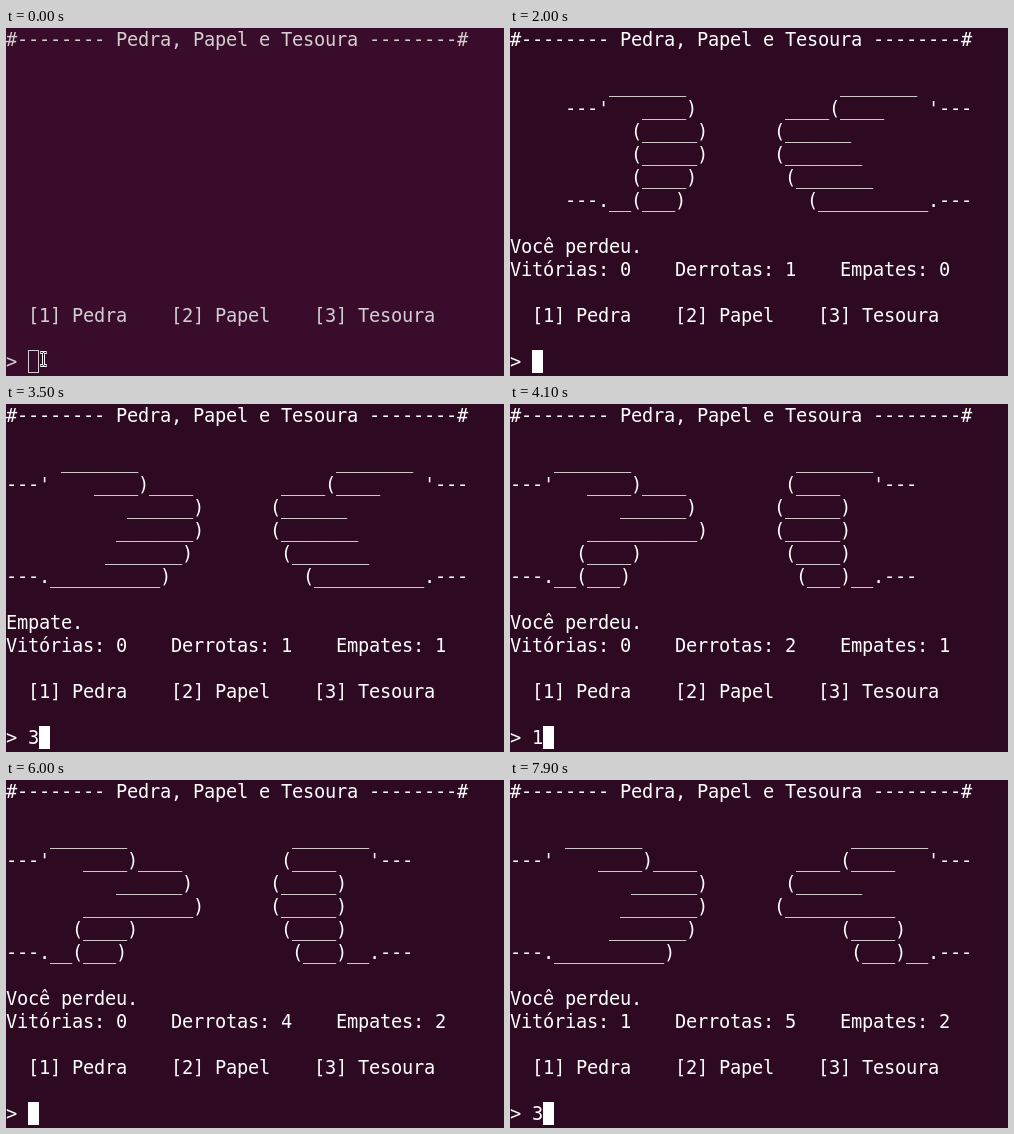
An HTML page for the animation above (8 s loop, 498 px wide and 348 px high).

```html
<!DOCTYPE html>
<html lang="pt">
<head>
<meta charset="utf-8">
<title>Pedra, Papel e Tesoura</title>
<style>
  html, body { margin: 0; width: 100%; height: 100%; overflow: hidden; }
  body { position: relative; background: #2d0922; color: #fff; }
  #screen {
    position: absolute; left: 0; top: 0; margin: 0; white-space: pre;
    font: 18.667px/23px "DejaVu Sans Mono", monospace;
  }
  #cursor {
    position: absolute; left: 22px; top: 322px; width: 11px; height: 23px;
    box-sizing: border-box; border: 1px solid; background: #fff;
  }
  #pointer { position: absolute; left: 33px; top: 322px; }
</style>
</head>
<body>
<pre id="screen"></pre>
<div id="cursor"></div>
<svg id="pointer" width="9" height="18" fill="none">
  <path id="beam" d="M1.5 2.5H3.5L4.5 3.5L5.5 2.5H7.5M4.5 3V15M1.5 15.5H3.5L4.5 14.5L5.5 15.5H7.5" stroke="#fff" stroke-width="3"/>
  <use href="#beam" style="stroke-width:1"/>
  <path d="M2 2.5H3.5L4.5 3.5L5.5 2.5H7M4.5 3V15M2 15.5H3.5L4.5 14.5L5.5 15.5H7" stroke="#111"/>
</svg>
<script>
const LOOP = 8000, CELL = 11, HALF = 21;

const hands = {
  1: [
    "         _______",
    "     ---'   ____)",
    "           (_____)",
    "           (_____)",
    "           (____)",
    "     ---.__(___)"
  ],
  2: [
    "     _______",
    "---'    ____)____",
    "           ______)",
    "          _______)",
    "         _______)",
    "---.__________)"
  ],
  3: [
    "    _______",
    "---'   ____)____",
    "          ______)",
    "       __________)",
    "      (____)",
    "---.__(___)"
  ]
};

// [time, player's hand, computer's hand]
const rounds = [
  [2000, 1, 2], [2700, 2, 2], [3600, 3, 1], [4500, 1, 1],
  [5500, 2, 3], [6000, 3, 1], [6700, 1, 3], [7300, 2, 3]
];
// [time, key pressed]
const keys = [
  [1600, 1], [2500, 2], [3500, 3], [4100, 1], [5000, 2],
  [5600, 3], [6500, 1], [7000, 2], [7900, 3]
];
// Spans in which the cursor is blinked off
const blinks = [[1200, 1600], [2400, 2500], [4900, 5000]];
// [time, background, text]
const looks = [
  [0, "#380c2a", "#d3ced1"],
  [600, "#330b26", "#e9e6e8"],
  [700, "#2d0922", "#ffffff"]
];
const messages = ["Empate.", "Você venceu.", "Você perdeu."];

const screen = document.getElementById("screen");
const cursor = document.getElementById("cursor");
const pointer = document.getElementById("pointer");

const mirror = line => [...line.padEnd(HALF)].reverse()
  .map(c => c === ")" ? "(" : c === "(" ? ")" : c).join("");

const latest = (steps, t) => steps.filter(s => s[0] <= t).pop();

// Snap the font's advance to the terminal grid
function fitGrid() {
  const probe = document.createElement("span");
  probe.textContent = "0".repeat(100);
  screen.append(probe);
  const advance = probe.getBoundingClientRect().width / 100;
  screen.style.letterSpacing = CELL - advance + "px";
  probe.remove();
}

function board(t) {
  const played = rounds.filter(r => r[0] <= t);
  if (!played.length) return Array(9).fill("");
  const score = [0, 0, 0];
  let result;
  for (const [, you, cpu] of played) {
    result = (you - cpu + 3) % 3;
    score[result]++;
  }
  const [, you, cpu] = played[played.length - 1];
  return [
    ...hands[you].map((line, i) => line.padEnd(HALF) + mirror(hands[cpu][i])),
    "",
    messages[result],
    `Vitórias: ${score[1]}    Derrotas: ${score[2]}    Empates: ${score[0]}`
  ];
}

function typed(t) {
  const key = latest(keys, t);
  const round = latest(rounds, t);
  return key && (!round || key[0] > round[0]) ? key[1] : "";
}

function draw(t) {
  const [, back, ink] = latest(looks, t);
  document.body.style.background = back;
  document.body.style.color = ink;

  const input = typed(t);
  const text = [
    "#-------- Pedra, Papel e Tesoura --------#",
    "",
    ...board(t),
    "",
    "  [1] Pedra    [2] Papel    [3] Tesoura",
    "",
    "> " + input
  ].join("\n");
  if (screen.textContent !== text) screen.textContent = text;

  cursor.style.left = (input ? 3 : 2) * CELL + "px";
  cursor.style.background = t < 600 ? "none" : "currentColor";
  cursor.hidden = blinks.some(([from, to]) => t >= from && t < to);

  pointer.style.display = t < 700 ? "" : "none";
  pointer.style.top = (t < 600 ? 322 : 330) + "px";
}

function tick() {
  draw(performance.now() % LOOP);
  requestAnimationFrame(tick);
}

fitGrid();
tick();
</script>
</body>
</html>
```
